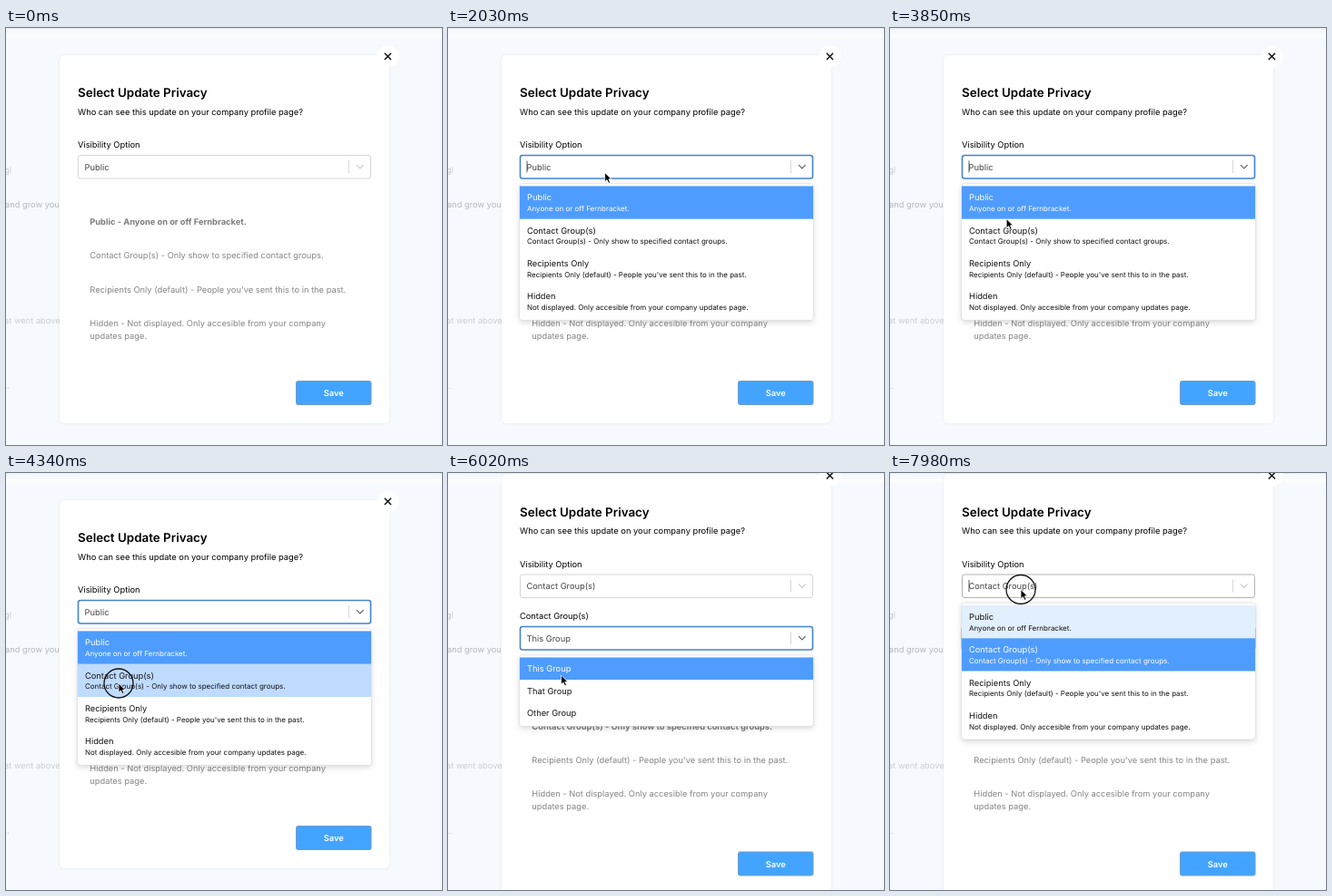
Animation, 480 px wide and 460 px high, one loop 8000 ms. Source, as an HTML page:

```html
<!DOCTYPE html>
<html lang="en">
<head>
<meta charset="utf-8">
<title>Select Update Privacy</title>
<style>
  html, body { margin: 0; width: 100%; height: 100%; overflow: hidden; background: #f6f9fd; }
  svg { display: block; width: 480px; height: 460px; }
  text { font-family: Inter, "Open Sans", sans-serif; font-size: 9.31px; text-rendering: geometricPrecision; white-space: pre; }
  .shadow { filter: drop-shadow(0 2px 3px rgba(0, 0, 0, .16)); }
</style>
</head>
<body>
<svg viewBox="0 0 480 460" xmlns="http://www.w3.org/2000/svg">
  <rect width="480" height="460" fill="#f6f9fd"/>
  <rect y="6" width="480" height="5" fill="#fff" opacity=".5"/>
  <rect width="480" height="1" fill="#eceef1"/>
  <g fill="#b4b8be">
    <text x="-2" y="159.500" opacity=".75">gl</text>
    <text x="-1" y="198">and grow your</text>
    <text x="-2" y="325.500" opacity=".65">at went above</text>
    <text x="-4" y="398" opacity=".8">...</text>
  </g>
  <g id="modal"></g>
  <g id="pointer">
    <circle id="ring" r="16" fill="none" stroke="#111" stroke-width="1.3"/>
    <path d="M0 0V10.200L2.400 8L4.100 11.800L5.900 11L4.300 7.300H7.300Z" fill="#000" stroke="#fff" stroke-width=".8" stroke-linejoin="round"/>
  </g>
</svg>
<script>
const LOOP = 8000, TICK = 70, SHIFT = 28.5;
const LEFT = 79, WIDTH = 323, FIELD_H = 26;
const modal = document.getElementById('modal');
const pointer = document.getElementById('pointer');
const ring = document.getElementById('ring');

const privacy = [
  ['Public', 'Anyone on or off Fernbracket.'],
  ['Contact Group(s)', 'Contact Group(s) - Only show to specified contact groups.'],
  ['Recipients Only', "Recipients Only (default) - People you've sent this to in the past."],
  ['Hidden', 'Not displayed. Only accesible from your company updates page.']
];
const groups = [['This Group'], ['That Group'], ['Other Group']];
const notes = [
  [216.5, 'Public - Anyone on or off Fernbracket.'],
  [254, privacy[1][1]],
  [291.5, privacy[2][1]],
  [328.5, 'Hidden - Not displayed. Only accesible from your company'],
  [342.6, 'updates page.']
];

// Pointer moves: start, end, target x, target y
const startAt = [-14, 250];
const moves = [
  [350, 1120, 175.5, 156],
  [1960, 2310, 148, 189],
  [2660, 3010, 140, 149],
  [3570, 3990, 124, 232],
  [4760, 5110, 129.5, 181.5],
  [5670, 6370, 119.5, 264.5],
  [7280, 7800, 144, 128.5]
];
const clicks = [[1400, 1610], [2520, 2650], [3220, 3430], [4200, 4400], [5110, 5390], [6930, 6990], [7840, 8000]];
const presses = [[4270, 4400], [6820, 6960]];

// Interface states: time, focused field, open menu
const states = [
  [0, '', ''],
  [1540, 'privacy', 'privacy'],
  [2590, 'privacy', ''],
  [3360, 'privacy', 'privacy'],
  [4400, 'privacy', ''],
  [5390, 'group', 'group'],
  [6980, 'group', ''],
  [7950, 'group', 'privacy']
];

const within = (t, spans) => spans.some(([a, b]) => t >= a && t < b);
const ease = u => u * u * (3 - 2 * u);

function pointerAt(t) {
  let [x, y] = startAt;
  for (const [a, b, tx, ty] of moves) {
    if (t <= a) break;
    const s = ease(Math.min(1, (t - a) / (b - a)));
    x += (tx - x) * s;
    y += (ty - y) * s;
  }
  return [x, y];
}

const text = (x, y, str, fill, extra = '') => `<text x="${x}" y="${y}" fill="${fill}" ${extra}>${str}</text>`;
const rect = (x, y, w, h, fill, extra = '') =>
  `<rect x="${x}" y="${y}" width="${w}" height="${h}" fill="${fill}" ${extra}/>`;

function field(y, value, focused, caret, [px, py]) {
  const hover = px > LEFT && px < LEFT + WIDTH && py > y && py < y + FIELD_H;
  const edge = focused ? '#4483d2' : hover ? '#b3b3b3' : '#d6d6d6';
  return rect(LEFT + .5, y + .5, WIDTH - 1, FIELD_H - .5, '#fff',
      `rx="2.500" stroke="${edge}" stroke-width="${focused ? 1.6 : 1}"`) +
    text(86.5, y + 16.5, value, '#444') +
    rect(377, y + 6, .8, 14, '#d0d0d0') +
    `<path d="M386.300 ${y + 11.4}l3.500 3.500l3.500 -3.500" fill="none" stroke="${focused ? '#666' : '#ccc'}" stroke-width="1.3" stroke-linecap="round"/>` +
    (caret ? rect(86.6, y + 6.5, .8, 13, '#333') : '');
}

function menu(y, items, step, selected, pressed, [px, py]) {
  const top = y + 34.4;
  const over = Math.floor((py - top) / step);
  const active = over >= 0 && over < items.length ? over : 0;
  let out = rect(LEFT, top - 2.6, WIDTH, items.length * step + 5, '#fff',
    'rx="2.500" stroke="#000" stroke-opacity=".1" stroke-width=".8" class="shadow"');
  items.forEach(([title, sub], i) => {
    const iy = top + i * step, on = i === selected;
    const fill = on ? '#4e9cfd' : i === active ? (pressed ? '#bfdbff' : '#e2effc') : '#fff';
    const ink = on ? '#fff' : '#111';
    out += rect(LEFT, iy, WIDTH, step, fill) + text(87, iy + 15.8, title, ink);
    if (sub) out += text(87, iy + 27.6, sub, ink, 'style="font-size:7.980px"');
  });
  return out;
}

function draw(t) {
  const pos = pointerAt(t);
  const [since, focus, open] = states.filter(s => s[0] <= t).pop();
  const split = t >= 4400;
  const up = split ? -SHIFT : 0, down = split ? SHIFT : 0;
  const choice = split ? 1 : 0;
  const group = t >= 6980 ? 2 : 0;
  const blink = open && (t - since) % 1000 < 500;
  const pressed = within(t, presses);
  const y1 = 140 + up, y2 = 169;

  let out = rect(59, 30 + up, 363, 406 + down - up, '#fff', 'rx="5" style="filter:drop-shadow(0 0 1px rgba(60,80,110,.12))"') +
    `<circle cx="420.500" cy="${31.5 + up}" r="12" fill="#fff"/>` +
    `<path d="M416.800 ${27.8 + up}l7.200 7.200m0 -7.200l-7.200 7.200" stroke="#111" stroke-width="1.5"/>` +
    text(79, 76 + up, 'Select Update Privacy', '#000', 'style="font-size:13.400px;font-weight:600"') +
    text(79, 95.5 + up, 'Who can see this update on your company profile page?', '#000') +
    text(79, 132.4 + up, 'Visibility Option', '#000') +
    field(y1, privacy[choice][0], focus === 'privacy', blink && open === 'privacy', pos);

  if (split) {
    out += text(79, 161, 'Contact Group(s)', '#000') +
      field(y2, groups[group][0], focus === 'group', blink && open === 'group', pos);
  }
  notes.forEach(([y, str], i) => {
    out += text(92.3, y + down, str, i === choice ? '#7c7c7c' : '#858585', i === choice ? 'font-weight="700"' : '');
  });
  out += rect(319.5, 389.5 + down, 82.5, 26, '#43a4ff', 'rx="2" stroke="#6f9cc9" stroke-width="1"') +
    text(360.7, 406 + down, 'Save', '#fff', 'text-anchor="middle" font-weight="600"');

  if (open === 'privacy') out += menu(y1, privacy, 36.4, choice, pressed, pos);
  if (open === 'group') out += menu(y2, groups, 24.6, group, pressed, pos);
  modal.innerHTML = out;

  pointer.setAttribute('transform', `translate(${pos[0]} ${pos[1]})`);
  ring.setAttribute('visibility', within(t, clicks) ? 'visible' : 'hidden');
}

const begin = performance.now();
function frame() {
  const t = (performance.now() - begin) % LOOP;
  draw(Math.floor(t / TICK) * TICK);
  requestAnimationFrame(frame);
}
frame();
</script>
</body>
</html>
```
